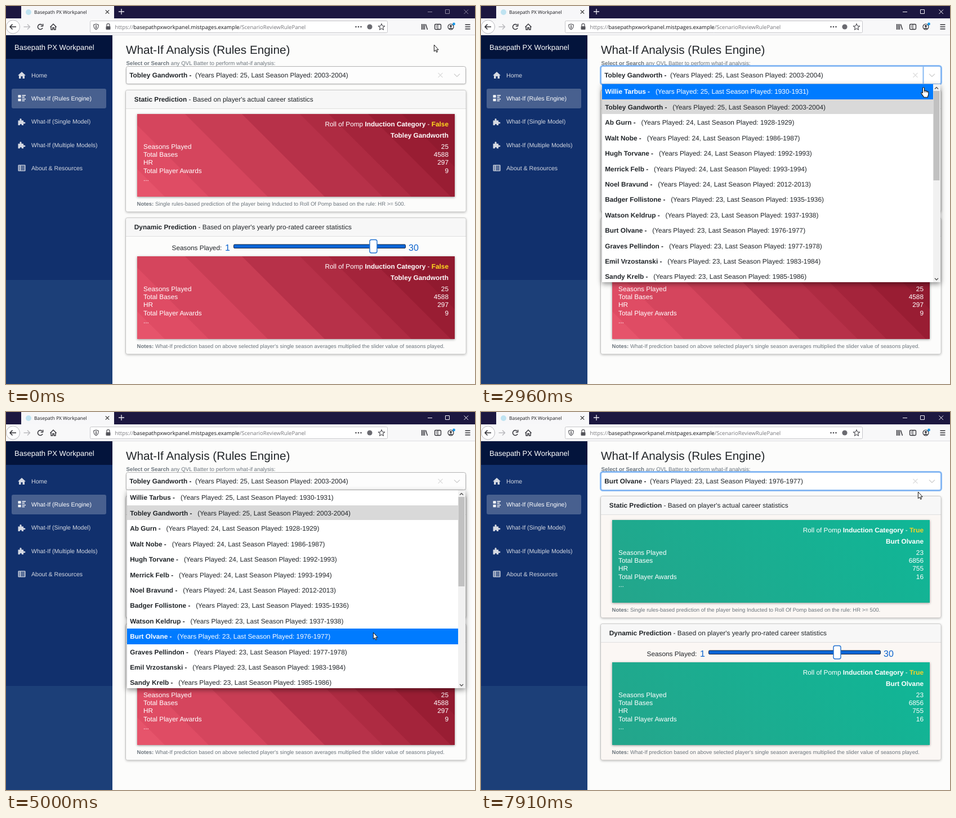
These frames come from a looping animation (833x672 px, 8 s). An HTML page with a canvas:

```html
<!DOCTYPE html>
<html lang="en">
<head>
<meta charset="utf-8">
<title>Basepath PX Workpanel</title>
<style>
html, body { margin: 0; width: 100%; height: 100%; overflow: hidden; background: #fcfcfb; }
canvas { display: block; width: 833px; height: 672px; }
</style>
</head>
<body>
<canvas id="stage" width="833" height="672"></canvas>
<script>
const ctx = document.getElementById('stage').getContext('2d');
const LOOP = 8000;
const SANS = '"Liberation Sans", Arial, sans-serif';
const UI = '"Open Sans", "Noto Sans", sans-serif';
const BASE = 11.84, INK = '#212529', MUTED = '#6c757d', BLUE = '#0b63ce', FOCUS = '#86b8f3';

const players = [
  ['Willie Tarbus', 25, 1930], ['Tobley Gandworth', 25, 2003], ['Ab Gurn', 24, 1928],
  ['Walt Nobe', 24, 1986], ['Hugh Torvane', 24, 1992], ['Merrick Felb', 24, 1993],
  ['Noel Bravund', 24, 2012], ['Badger Follistone', 23, 1935], ['Watson Keldrup', 23, 1937],
  ['Burt Olvane', 23, 1976], ['Graves Pellindon', 23, 1977], ['Emil Vrzostanski', 23, 1983],
  ['Sandy Krelb', 23, 1985]
];
const before = { player: players[1], stats: [25, 4588, 297, 9], verdict: 'False', thumb: 652.5, body: '#fcfcfb' };
const after = { player: players[9], stats: [23, 6856, 755, 16], verdict: 'True', thumb: 632.5, body: '#fbf7f4' };

// Pointer moves: start, end, steps, target x, y, easing
const linear = p => p, easeIn = p => p * p, easeOut = p => 1 - (1 - p) ** 2;
const smooth = p => p * p * (3 - 2 * p);
const moves = [
  [500, 1250, 11, 787, 125, smooth],
  [1350, 1510, 3, 798, 124, linear],
  [2960, 3210, 4, 750, 207, linear],
  [3520, 3740, 4, 711, 312, easeOut],
  [3900, 4110, 4, 690, 364, smooth],
  [4360, 4520, 3, 652, 390, smooth],
  [4900, 4900, 1, 652, 392, linear],
  [6540, 6860, 5, 711, 277, easeIn],
  [7170, 7380, 4, 742, 199, smooth],
  [7690, 7910, 4, 776, 142, smooth]
];

function pointer(t) {
  let x = 760, y = 69;
  for (const [t0, t1, n, tx, ty, ease] of moves) {
    if (t < t0) break;
    const k = t >= t1 ? n : Math.floor((t - t0) / (t1 - t0) * (n - 1) + 1e-6) + 1;
    const p = ease(k / n);
    x += (tx - x) * p;
    y += (ty - y) * p;
  }
  return { x, y };
}

function box(x, y, w, h, fill, r = 0, stroke, width = 1) {
  ctx.beginPath();
  ctx.roundRect(x, y, w, h, r);
  if (fill) { ctx.fillStyle = fill; ctx.fill(); }
  if (stroke) { ctx.strokeStyle = stroke; ctx.lineWidth = width; ctx.stroke(); }
}

function shadowed(blur, dy, color, draw) {
  ctx.save();
  ctx.shadowBlur = blur;
  ctx.shadowOffsetY = dy;
  ctx.shadowColor = color;
  draw();
  ctx.restore();
}

function disc(x, y, r, fill, stroke, width = 1) {
  ctx.beginPath();
  ctx.arc(x, y, r, 0, 7);
  if (fill) { ctx.fillStyle = fill; ctx.fill(); }
  if (stroke) { ctx.strokeStyle = stroke; ctx.lineWidth = width; ctx.stroke(); }
}

// Draws an SVG path at x, y
function shape(d, x, y, fill, stroke, width = 1.3) {
  const path = new Path2D(d);
  ctx.save();
  ctx.translate(x, y);
  ctx.lineJoin = 'round';
  if (fill) { ctx.fillStyle = fill; ctx.fill(path); }
  if (stroke) { ctx.strokeStyle = stroke; ctx.lineWidth = width; ctx.stroke(path); }
  ctx.restore();
}

// Parts are [text, color, bold]
function line(parts, x, y, size = BASE, right = false, family = SANS) {
  const face = bold => `${bold ? 'bold ' : ''}${size}px ${family}`;
  if (right) for (const [s, , bold] of parts) {
    ctx.font = face(bold);
    x -= ctx.measureText(s).width;
  }
  for (const [s, color, bold] of parts) {
    ctx.font = face(bold);
    ctx.fillStyle = color;
    ctx.fillText(s, x, y);
    x += ctx.measureText(s).width;
  }
}

function playerLine([name, years, season], x, y, color, gap) {
  const info = `(Years Played: ${years}, Last Season Played: ${season}-${season + 1})`;
  line([[name + ' -', color, true], [gap + info, color]], x, y);
}

function chrome(active) {
  box(0, 0, 833, 22, '#1c1740');
  box(27, 0, 165, 22, '#f7f7f9');
  disc(40, 11, 5, '#bfe3f1');
  line([['Basepath PX Workpanel', '#18181c']], 50, 14, 8.45, false, UI);
  shape('M-3.2-3.2L3.2 3.2M3.2-3.2L-3.2 3.2', 180, 10.5, null, '#333', 1.2);
  shape('M-5 0H5M0-5V5', 205, 10, null, '#eceaf2', 1.3);
  const c = active ? '#f4f2f8' : '#8e879f';
  shape('M0 0H8', 749, 10.5, null, c, 1);
  shape('M0 0H7V7H0Z', 780.5, 6.5, null, c, 1);
  shape('M0 0L7.5 7.5M7.5 0L0 7.5', 813.5, 6.5, null, c, 1);

  box(0, 22, 833, 30, '#f8f8f9');
  box(0, 51, 833, 1, '#dcdce0');
  const k = '#2f2f35';
  disc(12.5, 37, 12, '#fff', '#b9b9be');
  shape('M5.5 0H-5M-1-4.5L-5.5 0L-1 4.5', 12.5, 37, null, k, 1.6);
  shape('M-5.5 0H5M1-4.5L5.5 0L1 4.5', 37, 37, null, '#b9b9bd', 1.5);
  shape('M4 2A4.5 4.5 0 1 1 3-3.2M4.6-5.2V-1.3H.8', 61, 37, null, k, 1.5);
  shape('M-5.5 .5L0-5L5.5 .5M-4-.5V5H-1.2V1.5H1.2V5H4V-.5', 84, 37, null, k, 1.4);

  box(149.5, 26.5, 528, 21, '#fff', 2, '#c6c6ca');
  shape('M0-5L4.2-3.6C4.4 1 3 3.4 0 5C-3 3.4-4.4 1-4.2-3.6Z', 160, 37, null, '#55555b', 1.2);
  shape('M0-3V3', 160, 37, null, '#55555b', 1.6);
  box(177.5, 36, 8, 6, '#55555b', 1);
  shape('M-2.5 0V-2.2A2.5 2.5 0 0 1 2.5-2.2V0', 181.5, 36, null, '#55555b', 1.3);
  line([['https://', '#77777c'], ['basepathpxworkpanel.mistpages.example', '#16161a'],
    ['/ScenarioReviewRulePanel', '#77777c']], 193.5, 40.7, 9.6, false, UI);
  for (const x of [621.5, 626, 630.5]) disc(x, 37, 1.3, '#4a4a50');
  disc(646, 37, 4.6, '#6a6a70');
  let star = '';
  for (let i = 0; i < 10; i++) {
    const a = i * Math.PI / 5 - Math.PI / 2, r = i % 2 ? 2.7 : 6;
    star += `${i ? 'L' : 'M'}${r * Math.cos(a)} ${r * Math.sin(a)}`;
  }
  shape(star + 'Z', 667, 37.4, null, '#4a4a50', 1.1);
  shape('M-4.5-5V5M-2-5V5M.5-5V5M2.5-4.5L5.5 5', 743, 37, null, k, 1.4);
  box(761.5, 32.5, 11, 9, null, 1.5, k, 1.3);
  shape('M0-4V4M-3.5-1.5H-1.5M-3.5 1H-1.5', 767, 37, null, k, 1);
  disc(790, 37, 5, null, k, 1.2);
  disc(790, 35.7, 1.9, k);
  shape('M-3.4 3.4C-2 .7 2 .7 3.4 3.4Z', 790, 37, k);
  disc(795.5, 32, 2.4, '#1797e8');
  shape('M-4.5-3.7H4.5M-4.5 0H4.5M-4.5 3.7H4.5', 820, 37, null, k, 1.4);
}

const house = 'M0-6L7 .5H5V6H1.5V2H-1.5V6H-5V.5H-7Z';
const tiles = 'M-6.5-6H-1.5V-1.5H-6.5ZM-6.5 .5H-1.5V5H-6.5ZM.5-6H7V-4.5H.5ZM.5-3H5V-1.5H.5ZM.5 .5H7V2H.5ZM.5 3.5H5V5H.5Z';
const puzzle = 'M-6.5-2H-3.2C-5.2-6.4 .6-7-.5-2H3V1C7.6-.6 7.6 5 3 3.4V6.5H-.2C.6 3.4-4 3.4-3.2 6.5H-6.5Z';
const sheet = 'M-5.8-4.8H5.8V4.8H-5.8ZM-5.8-1.6H5.8M-5.8 1.6H5.8M-2.6-4.8V4.8';

function sidebar() {
  box(0, 52, 189, 435, '#11306d');
  box(0, 487, 189, 185, '#1c3f78');
  box(0, 52, 189, 42, '#03143c');
  line([['Basepath PX Workpanel', '#fff']], 15, 77.5, 13.02);
  box(10, 147, 168, 35, '#48608f', 3);
  const items = [['Home', house], ['What-If (Rules Engine)', tiles], ['What-If (Single Model)', puzzle],
    ['What-If (Multiple Models)', puzzle], ['About & Resources', sheet]];
  items.forEach(([label, icon], i) => {
    const y = 123 + i * 41.25, color = i === 1 ? '#fff' : '#d5d9e2';
    if (icon === sheet) shape(icon, 28, y, null, color, 1.4);
    else shape(icon, 28, y, color);
    line([[label, color]], 45, Math.round(y + 3.8), 10.58);
  });
}

function select(player, { focus, toggle, hover }) {
  line([['Select or Search', MUTED, true], [' any QVL Batter to perform what-if analysis:', MUTED]], 213.5, 104.6, 9.77);
  if (focus) {
    box(212.5, 106.5, 605, 33, '#fff', 4, FOCUS, 3);
  } else {
    shadowed(3, 1, 'rgba(0,0,0,.3)', () => box(213.5, 108.5, 603, 29.5, '#fff', 3));
    box(213.5, 107.5, 603, 31, '#fdfdfd', 3, '#b4b4b4');
  }
  if (toggle) box(784.5, 108, 2, 30, FOCUS);
  playerLine(player, 219.2, 127, INK, '  ');
  shape('M-4-4L4 4M4-4L-4 4', 771.5, 123, null, '#dcdcdc', 1.1);
  shape('M-5-2.3L0 2.5L5-2.3', 801, 123, null, hover ? '#333' : '#cfcfcf', hover ? 1.6 : 1.2);
}

function banner(y, state) {
  const x = 233, w = 564, h = 147, win = state === after;
  shadowed(4, 1, 'rgba(0,0,0,.4)', () => box(x, y, w, h, '#b33'));
  ctx.save();
  ctx.beginPath();
  ctx.rect(x, y, w, h);
  ctx.clip();
  if (win) {
    const g = ctx.createLinearGradient(x + 104, y + 252, x + 460, y - 104);
    g.addColorStop(0, '#24a58b');
    g.addColorStop(1, '#0fb797');
    box(x, y, w, h, g);
  } else {
    box(x, y, w, h, '#e6546b');
    const bands = [[-98, '#df4c64'], [-20, '#d5455d'], [85, '#c83d54'], [186, '#b73149'],
      [289, '#ae2b42'], [340, '#a4243b'], [410, '#991d33'], [470, '#911a2f']];
    for (const [left, color] of bands) shape(`M${left} 0H700V${h}H${left + h}Z`, x, y, color);
  }
  ctx.restore();

  const white = '#fff', right = 786;
  line([['Roll of Pomp ', white], ['Induction Category', white, true], [' - ', white],
    [state.verdict, win ? '#f5d327' : '#ffdc1e', true]], right, y + 22, BASE, true);
  line([[state.player[0], white, true]], right, y + 42, BASE, true);
  ['Seasons Played', 'Total Bases', 'HR', 'Total Player Awards', '...'].forEach((label, i) => {
    const row = Math.round(y + 61.7 + i * 14.35);
    line([[label, white]], 244, row);
    if (i < 4) line([[String(state.stats[i]), white]], right, row, BASE, true);
  });
}

function card(y, h, title, sub, note, bannerY, state) {
  shadowed(4, 1, 'rgba(0,0,0,.3)', () => box(213, y, 604, h, state.body, 3));
  box(213, y, 604, 32, '#f7f7f7', [3, 3, 0, 0]);
  box(213, y + 32, 604, 1, '#dfdfdf');
  box(212.5, y - .5, 604.5, h, null, 3, 'rgba(0,0,0,.125)');
  line([[title, INK, true], [' - ' + sub, INK]], 227.8, y + 20.3);
  banner(bannerY, state);
  line([['Notes:', MUTED, true], [' ' + note, MUTED]], 232.6, bannerY + 163, 9.56);
}

function slider(thumb) {
  line([['Seasons Played:', INK]], 294.5, 434);
  line([['1', BLUE]], 389, 434.5, 16);
  line([['30', BLUE]], 715, 434.5, 16);
  box(404.5, 424, 305, 6.5, '#0b66d8', 1.5, '#11223c');
  box(thumb - 6.5, 415.5, 13, 23.5, '#fff', 3, '#1f6fd0', 1.4);
}

function list(active) {
  const top = 139, pitch = 27.42, h = 352;
  shadowed(9, 3, 'rgba(0,0,0,.45)', () => box(215, top, 601, h, '#fff'));
  ctx.save();
  ctx.beginPath();
  ctx.rect(215, top, 601, h);
  ctx.clip();
  const rowTop = i => Math.floor(top + i * pitch);
  players.forEach((p, i) => {
    const y = rowTop(i), on = i === active;
    if (on) box(215, y, 588, rowTop(i + 1) - y, '#007bff');
    else if (i === 1) box(215, y, 588, 26, '#d9d9d9');
    playerLine(p, 220.2, Math.round(top + i * pitch + 17.4), on ? '#fff' : INK, '   ');
  });
  box(803, top, 13, h, '#f1f1f1');
  box(803.5, 151, 11, 159, '#c1c1c1');
  shape('M-3 1.5L0-1.5L3 1.5', 809, 146, null, '#505050', 1.4);
  shape('M-3-1.5L0 1.5L3-1.5', 809, 485.5, null, '#505050', 1.4);
  ctx.restore();
}

function cursor({ x, y }, hand) {
  if (hand) {
    shape('M-1.6 1.4C-1.6 -.5 1.4 -.5 1.4 1.4V6.2C2 5.3 4 5.5 4.2 6.8C5 6 6.6 6.4 6.8 7.6C7.6 7 8.8 7.6 8.8 8.8V12C8.8 14 7.4 15 7.4 17.5H.4C.2 15.5 -3.6 12.5 -4.2 10.2C-4.4 8.8 -2.8 8.4 -1.6 10Z',
      x, y, '#fff', '#111', 1.1);
    shape('M1.4 6V9M4.2 6.8V9.3M6.8 7.6V9.6', x, y, null, '#111', .8);
  } else {
    shape('M.4 0V11.8L3 9.4L4.8 13.3L6.5 12.5L4.8 8.8H8.2Z', x, y, '#fff', '#111', 1);
  }
}

function draw(t) {
  const chosen = t >= 5060;
  const open = t >= 1950 && !chosen;
  const state = chosen ? after : before;
  const tip = pointer(t);

  ctx.textRendering = 'geometricPrecision';
  box(0, 0, 833, 672, '#fcfcfb');
  chrome(t >= 1790);
  sidebar();
  line([['What-If Analysis (Rules Engine)', INK]], 213, 84.8, 20.72);
  card(150, 216, 'Static Prediction', "Based on player's actual career statistics",
    'Single rules-based prediction of the player being Inducted to Roll Of Pomp based on the rule: HR >= 500.', 192, state);
  card(377, 242, 'Dynamic Prediction', "Based on player's yearly pro-rated career statistics",
    "What-If prediction based on above selected player's single season averages multiplied the slider value of seasons played.", 445, state);
  slider(state.thumb);
  select(state.player, {
    focus: (t >= 1790 && t < 4900) || t >= 5280,
    toggle: t >= 1790 && t < 4900,
    hover: t >= 1430 && t < 2960
  });
  if (open) list(t < 2960 ? -1 : Math.max(0, Math.floor((tip.y - 142) / 27.42)));
  cursor(tip, t >= 1430 && t < 4900);
}

const start = performance.now();
function tick(now) {
  draw(Math.max(0, now - start) % LOOP);
  requestAnimationFrame(tick);
}
draw(0);
requestAnimationFrame(tick);
</script>
</body>
</html>
```
